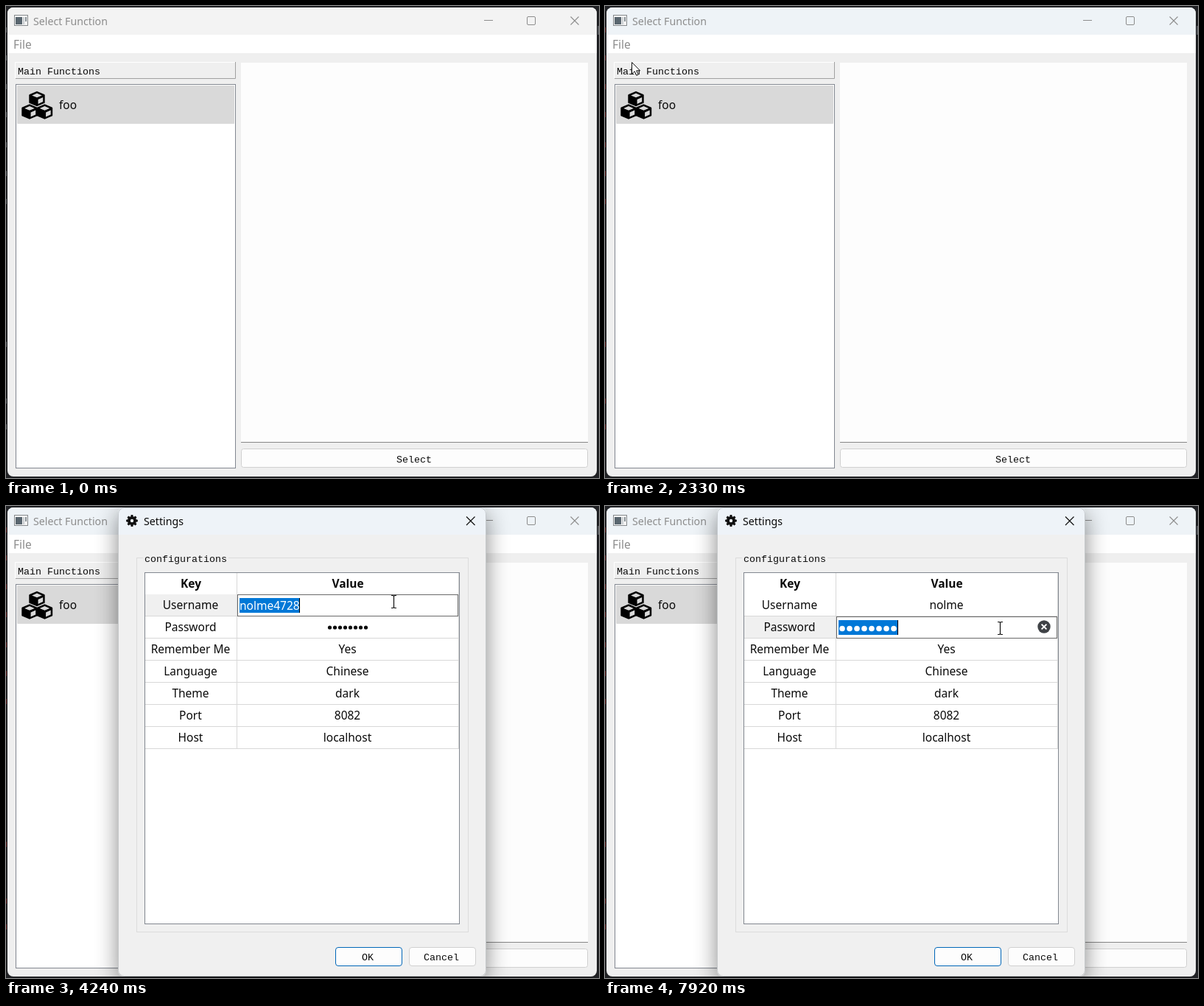
An HTML page for the animation above (7.99 s loop, 805x641 px).

```html
<!DOCTYPE html>
<html lang="en">
<head>
<meta charset="utf-8">
<title>Settings dialog</title>
<style>
  html, body { margin: 0; width: 100%; height: 100%; overflow: hidden; background: #202124; }
  svg { display: block; }
  text { font: 15.5px "Noto Sans", "Open Sans", sans-serif; fill: #0a0a0a; white-space: pre; }
  .cap { font-size: 14.2px; }
  .mono { font: 13.33px "Liberation Mono", "DejaVu Sans Mono", monospace; }
  .bold { font-weight: 700; }
  .mid { text-anchor: middle; }
  #dialog { transform-origin: 402px 320px; }
</style>
</head>
<body>
<svg id="stage" width="805" height="641" viewBox="0 0 805 641"></svg>
<script>
const LOOP = 7990, STEP = 70;
const BLUE = '#0078d7', INK = '#0a0a0a';
const USER = 'nolme4728', SHORT = 'nolme';

// Pointer track: time, x, y
const track = [
  [130, 300, 524], [900, 16, 77], [1030, 16, 77], [1170, 21, 62], [1640, 21, 62],
  [1780, 35, 75], [1910, 36, 76], [2330, 36, 76], [2540, 155, 219], [2740, 155, 219],
  [2950, 215, 258], [3080, 300, 266], [3290, 440, 215], [3500, 515, 150],
  [3710, 526, 131], [4240, 526, 130], [6239, 526, 130], [6240, 525, 132],
  [7030, 525, 132], [7170, 530, 146], [7380, 532, 152], [7570, 532, 152], [7850, 536, 166]
];
const erasures = [5250, 5440, 5710, 5910];
const rows = [
  ['Username', ''], ['Password', ''], ['Remember Me', 'Yes'], ['Language', 'Chinese'],
  ['Theme', 'dark'], ['Port', '8082'], ['Host', 'localhost']
];

const attrs = o => Object.entries(o).map(([k, v]) => ` ${k}="${v}"`).join('');
const rect = (x, y, w, h, fill, more = {}) =>
  `<rect${attrs({ x, y, width: w, height: h, fill, ...more })}/>`;
const box = (x, y, w, h, stroke, fill = 'none', rx = 0, more = {}) =>
  rect(x + .5, y + .5, w - 1, h - 1, fill, { stroke, rx, ...more });
const line = (d, stroke, w = 1, more = {}) =>
  `<path${attrs({ d, stroke, 'stroke-width': w, fill: 'none', ...more })}/>`;
const shape = (d, fill, more = {}) => `<path${attrs({ d, fill, ...more })}/>`;
const text = (x, y, s, cls = '', more = {}) =>
  `<text${attrs({ x, y, class: cls, ...more })}>${s}</text>`;
const group = (id, body, more = {}) => `<g${attrs({ id, ...more })}>${body}</g>`;
const dots = (x, y, gap, r, fill, id) => group(id,
  Array.from({ length: 8 }, (_, i) => `<circle cx="${x + gap * i}" cy="${y}" r="${r}"/>`).join(''), { fill });

function gear(cx, cy, outer, inner) {
  const pts = [];
  for (let i = 0; i < 8; i++) {
    for (const [off, r] of [[-.28, inner], [-.17, outer], [.17, outer], [.28, inner]]) {
      const a = i * Math.PI / 4 + off;
      pts.push((cx + r * Math.cos(a)).toFixed(2) + ' ' + (cy + r * Math.sin(a)).toFixed(2));
    }
  }
  return 'M' + pts.join('L') + 'Z';
}
const ring = (cx, cy, r, stroke, fill, w) =>
  `<circle${attrs({ cx, cy, r, stroke, fill, 'stroke-width': w })}/>`;
const menuGear = y =>
  shape(gear(17, y, 8.5, 6.4), 'none', { stroke: INK, 'stroke-width': 1.5, 'stroke-linejoin': 'round' }) +
  ring(17, y, 2.6, INK, 'none', 1.5);

function cube(cx, cy) {
  const at = `translate(${cx} ${cy})`;
  return `<g transform="${at}">` +
    shape('M0-8.5L9.5-4.5V5.5L0 9.5L-9.5 5.5V-4.5Z', '#000', { stroke: '#000', 'stroke-width': 2.4, 'stroke-linejoin': 'round' }) +
    shape('M0-7L6.8-4L0-1.2L-6.8-4Z M1.6 1.4L8.2-1.5V4.6L1.6 7.5Z', '#d9d9d9') + '</g>';
}

function mainWindow() {
  return rect(2, 2, 800, 637, '#efefef', { rx: 8 }) +
    shape('M2 39V10A8 8 0 0 1 10 2H794A8 8 0 0 1 802 10V39Z', '#f3f3f3', { id: 'bar' }) +
    rect(2, 39, 800, 25, '#fff') +
    group('caption',
      box(11, 12, 19, 15, '#85898c', '#f4f4f4') + rect(13, 15, 9, 10, '#59666f') +
      rect(23, 15, 2, 10, '#c9ced2') + rect(26, 15, 2, 6, '#8b949a')) +
    group('chrome',
      text(37, 26, 'Select Function', 'cap', { fill: 'inherit', style: 'fill:inherit' }) +
      text(10, 58, 'File', '', { style: 'fill:inherit' }) +
      line('M649 19.5H661M766.5 14.5L777.5 25.5M777.5 14.5L766.5 25.5', 'currentColor', 1.1) +
      box(707, 14, 12, 12, 'currentColor', 'none', 1.5)) +
    line('M12.5 98V76.5H311', '#fff') + line('M13 98.5H311.5V76', '#a0a0a0') +
    text(16, 93, 'Main Functions', 'mono') +
    box(13, 106, 299, 522, '#828790', '#fff') +
    rect(15, 108, 295, 52, '#d9d9d9', { rx: 1 }) +
    cube(42, 125.5) + cube(32, 143) + cube(52.5, 143) +
    text(72, 140, 'foo') +
    rect(319, 77, 471, 515, '#fdfdfd') + line('M319 592.5H790', '#868686') +
    box(319, 601, 471, 26, '#d0d0d0', '#fdfdfd', 3) +
    text(554, 620, 'Select', 'mono mid');
}

function menu() {
  const item = (y, label, key) => text(39, y, label) + text(186, y, key);
  return rect(5, 66, 249, 91, '#f2f2f2', { style: 'filter:drop-shadow(2px 2px 1px #0008)' }) +
    rect(6, 67, 27, 89, '#fbfbfb') + box(5, 66, 249, 91, '#d5d5d5') +
    rect(7, 68, 245, 26, '#90c8f6', { id: 'hot' }) +
    line('M35 123.5H251', '#d0d0d0') +
    menuGear(81) + menuGear(107) +
    line('M12.8 136.8L21.2 145.2M21.2 136.8L12.8 145.2', '#000', 3.4) +
    item(86, 'Settings', 'Ctrl+O') + item(112, 'Settings Panel', 'Ctrl+P') + item(147, 'Close', 'Ctrl+Q');
}

function dialog() {
  const body = rows.map(([key, value], i) => {
    const y = 120 + 30 * i;
    return rect(189, y, 124, 29, 'none', { id: 'key' + i }) +
      rect(314, y, 300, 29, 'none', { id: 'cell' + i }) +
      line(`M189 ${y + 29.5}H615`, '#d8d8d8') +
      text(250.5, y + 20, key, 'mid', { id: 'name' + i }) +
      text(463.5, y + 20, value, 'mid', { id: 'value' + i });
  }).join('');
  return rect(152, 2, 500, 637, '#f0f0f0', { rx: 8, style: 'filter:drop-shadow(0 8px 15px #0007)' }) +
    shape('M152 39V10A8 8 0 0 1 160 2H644A8 8 0 0 1 652 10V39Z', '#eef3f8') +
    box(152, 2, 500, 637, '#a9adb1', 'none', 8, { 'stroke-opacity': .6 }) +
    shape(gear(171, 20, 8, 6), '#111') + ring(171, 20, 2.2, 'none', '#eef3f8', 0) +
    text(187, 26, 'Settings', 'cap') +
    line('M625 14.5L636.5 26M636.5 14.5L625 26', '#111', 1.2) +
    box(177, 70, 451, 509, '#dcdcdc') + rect(186, 68, 116, 5, '#f0f0f0') +
    text(188, 76, 'configurations', 'mono') +
    box(188, 90, 428, 478, '#828790', '#fff') +
    text(251, 111, 'Key', 'mid', { id: 'headKey' }) + text(464, 111, 'Value', 'mid', { id: 'headValue' }) +
    body + line('M313.5 91V329M614.5 91V329', '#d8d8d8') +
    box(190, 120, 122, 30, '#333', 'none', 0, { id: 'focus', 'stroke-dasharray': '1 1' }) +
    box(314, 120, 300, 30, '#ff8728', 'none', 0, { id: 'ring', 'stroke-dasharray': '1 1' }) +
    dots(439.5, 165, 7, 2.6, INK, 'hidden') +
    group('editor',
      box(314, 120, 300, 30, '#6a6a6a', '#fff') +
      rect(317, 125, 81, 20, BLUE, { id: 'mark' }) +
      text(317, 141, USER, '', { id: 'typed' }) +
      dots(322, 136.5, 10, 3.8, '#fff', 'secret') +
      group('clear', ring(596, 134, 8.7, 'none', '#3f4246', 0) +
        line('M592.6 130.6L599.4 137.4M599.4 130.6L592.6 137.4', '#fff', 2)) +
      rect(398, 125, 1, 20, '#000', { id: 'caret' })) +
    box(447, 599, 91, 26, '#0067b8', '#fdfdfd', 3.5) + text(491, 617, 'OK', 'mono mid') +
    box(547, 599, 91, 26, '#d0d0d0', '#fdfdfd', 3.5) + text(591, 617, 'Cancel', 'mono mid');
}

const ticks = [29, 67, 106, 144, 185, 224, 262, 456, 533, 568].map(y => rect(0, y, 1, 7, 'inherit', { style: 'fill:inherit' })).join('');
const stage = document.getElementById('stage');
stage.innerHTML = rect(0, 0, 805, 641, '#202124') + group('ticks', ticks) + rect(803, 27, 2, 12, '#55585c') +
  mainWindow() + group('menu', menu()) + group('dialog', dialog()) +
  shape('M.5 .5V16.2L4.2 12.7L6.8 18.3L9.2 17.2L6.7 11.8H11.6Z', '#fff', { id: 'arrow', stroke: '#111', 'stroke-width': 1 }) +
  line('M-3.5-8.5H-1L0-7.5L1-8.5H3.5M0-7.5V7.5M-3.5 8.5H-1L0 7.5L1 8.5H3.5', '#111', 1.2, { id: 'beam' });

const el = {};
stage.querySelectorAll('[id]').forEach(n => el[n.id] = n);
const set = (id, name, value) => el[id].setAttribute(name, value);
const show = (id, on) => { el[id].style.display = on ? '' : 'none'; };
const within = (t, a, b) => t >= a && t < b;
const ramp = (t, a, b) => Math.max(0, Math.min(1, (t - a) / (b - a)));

function pointer(t) {
  const i = track.findIndex(p => p[0] > t);
  if (i < 0) return track[track.length - 1].slice(1);
  if (i === 0) return track[0].slice(1);
  const [t0, x0, y0] = track[i - 1], [t1, x1, y1] = track[i];
  const k = Math.floor((t - t0) / STEP) * STEP / (t1 - t0);
  return [x0 + (x1 - x0) * k, y0 + (y1 - y0) * k].map(Math.round);
}

function drawPointer(t) {
  const beam = within(t, 4240, 6240) || t >= 7640;
  const [x, y] = pointer(t);
  show('arrow', t >= 130 && !beam);
  show('beam', beam);
  set('arrow', 'transform', `translate(${x} ${y})`);
  set('beam', 'transform', `translate(${x + .5} ${y})`);
}

function drawMain(t) {
  const active = within(t, 1240, 2260);
  const ink = active ? '#111' : '#8d8d8d';
  el.chrome.style.fill = el.chrome.style.color = ink;
  set('bar', 'fill', t < 1240 ? '#f3f3f3' : '#eef3f7');
  el.ticks.style.fill = t < 1240 ? '#5c5f63' : active ? '#8a6420' : '#6d2c2c';
  show('menu', within(t, 1310, 2190));
  el.menu.style.opacity = ramp(t, 1240, 1450) * (1 - ramp(t, 1980, 2190));
  show('hot', t >= 1710);
}

function drawTable(t) {
  const picked = t >= 3710;
  const row = t >= 7310 ? 1 : 0;
  const editing = within(t, 4040, 6240) || t >= 7640;
  rows.forEach((_, i) => {
    const on = picked && i === row, lit = on && !editing;
    set('key' + i, 'fill', lit ? BLUE : on ? '#f0f0f0' : 'none');
    set('cell' + i, 'fill', lit ? BLUE : 'none');
    el['name' + i].style.fill = el['value' + i].style.fill = lit ? '#fff' : INK;
  });
  for (const id of ['headKey', 'headValue']) {
    set(id, 'class', picked ? 'mid bold' : 'mid');
    set(id, 'y', picked ? 111 : 112);
  }
  el.value0.textContent = t < 6240 ? USER : SHORT;
  show('focus', !picked);
  show('ring', picked && !editing);
  set('ring', 'transform', `translate(0 ${row * 30})`);
  set('hidden', 'fill', row && !editing ? '#fff' : INK);
  drawEditor(t, editing, row);
}

function drawEditor(t, editing, row) {
  show('editor', editing);
  const cut = erasures.filter(e => t >= e).length;
  const marked = row === 1 || t < 4450;
  set('editor', 'transform', `translate(0 ${row * 30})`);
  show('mark', marked);
  show('typed', row === 0);
  show('secret', row === 1);
  show('clear', row === 1);
  el.typed.textContent = USER.slice(0, USER.length - cut);
  el.typed.style.fill = marked ? '#fff' : INK;
  set('caret', 'x', row ? 397 : 398 - 9 * cut);
  show('caret', !within(t, 4980, 5250));
}

function drawDialog(t) {
  show('dialog', t >= 2400);
  const k = ramp(Math.floor((t - 2330) / STEP) * STEP, 0, 210);
  const eased = 1 - (1 - k) ** 2;
  el.dialog.style.opacity = eased;
  el.dialog.style.transform = k < 1 ? `scale(${.92 + .08 * eased})` : 'none';
  drawTable(t);
}

const start = performance.now();
function frame() {
  const t = (performance.now() - start) % LOOP;
  drawMain(t);
  drawDialog(t);
  drawPointer(t);
  requestAnimationFrame(frame);
}
frame();
</script>
</body>
</html>
```
